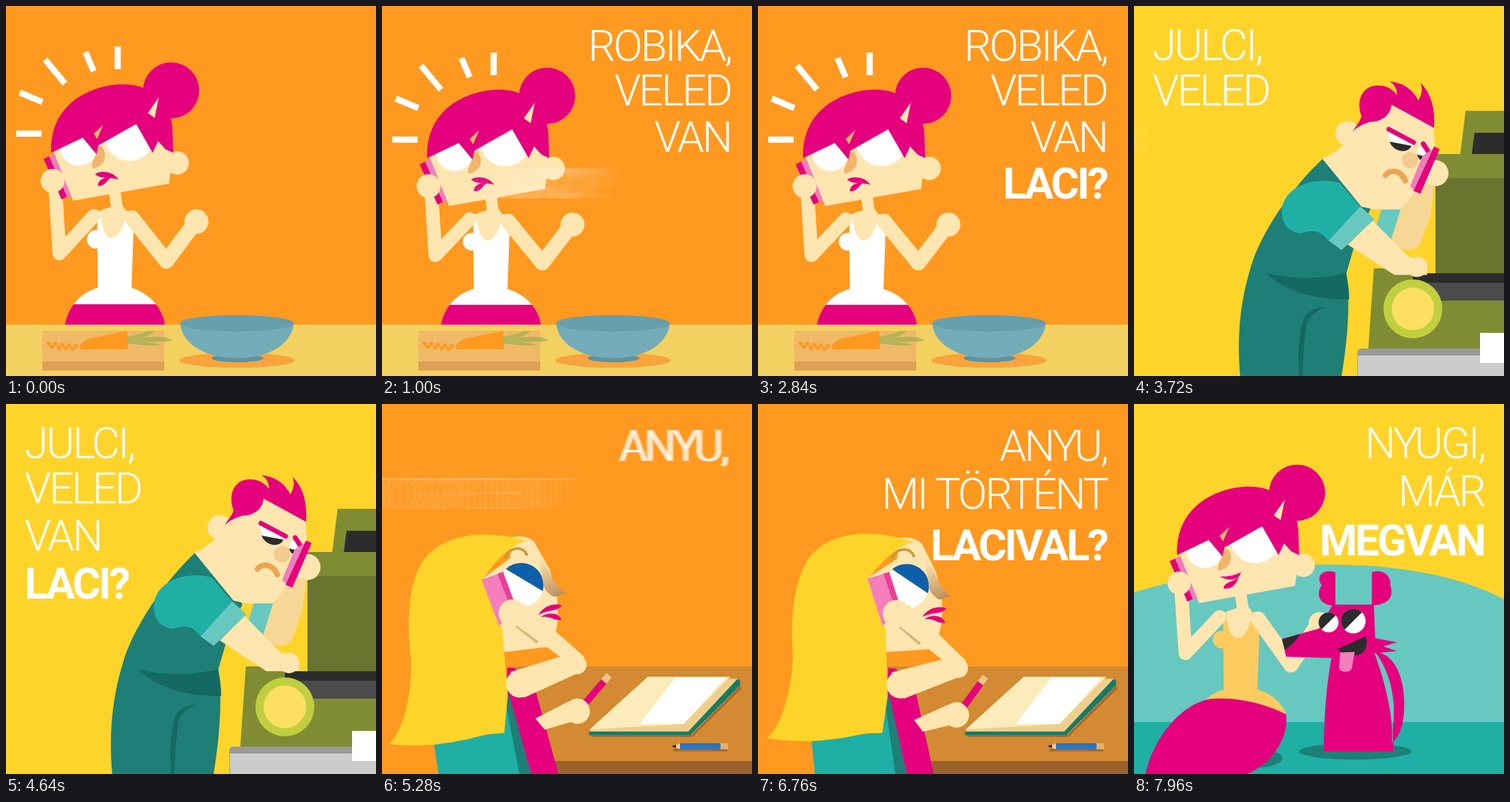
Write an HTML page with a canvas that moves like this. It is 540 px wide and 540 px high and loops after 8 s.

```html
<!DOCTYPE html>
<html lang="hu">
<head>
<meta charset="utf-8">
<title>Telefon</title>
<style>
html, body { margin: 0; width: 100%; height: 100%; overflow: hidden; background: #ff991f; }
canvas { display: block; width: 540px; height: 540px; }
</style>
</head>
<body>
<canvas id="stage" width="540" height="540"></canvas>
<script>
const ctx = document.getElementById('stage').getContext('2d');
const LOOP = 8000, BOB = 1840;
const C = {
  orange: '#ff991f', yellow: '#ffd42a', pink: '#e5007d', rose: '#f07fba', skin: '#ffe5b0',
  tan: '#f0b46c', teal: '#1fafa5', deep: '#1e7f76', mint: '#67c8c0', ink: '#2c2c2c',
  olive: '#7f8c33', moss: '#69742f', white: '#fff'
};

// Drawing helpers
function shape(color, d) {
  ctx.fillStyle = color;
  ctx.fill(new Path2D(d));
}
function line(color, width, d, cap = 'round') {
  ctx.strokeStyle = color;
  ctx.lineWidth = width;
  ctx.lineCap = cap;
  ctx.lineJoin = 'round';
  ctx.stroke(new Path2D(d));
}
function oval(color, x, y, rx, ry = rx) {
  ctx.fillStyle = color;
  ctx.beginPath();
  ctx.ellipse(x, y, rx, ry, 0, 0, 7);
  ctx.fill();
}
function box(color, x, y, w, h) {
  ctx.fillStyle = color;
  ctx.fillRect(x, y, w, h);
}
function group(draw) {
  ctx.save();
  draw();
  ctx.restore();
}
function shifted(x, y, draw) {
  group(() => { ctx.translate(x, y); draw(); });
}
function stretched(base, factor, draw) {
  group(() => {
    ctx.translate(0, base);
    ctx.scale(1, factor);
    ctx.translate(0, -base);
    draw();
  });
}
function turned(x, y, angle, draw) {
  group(() => {
    ctx.translate(x, y);
    ctx.rotate(angle);
    ctx.translate(-x, -y);
    draw();
  });
}
// White disc with a coloured segment between two angles
function splitEye(x, y, r, color, from, to = from + Math.PI) {
  oval(C.white, x, y, r);
  ctx.fillStyle = color;
  ctx.beginPath();
  ctx.arc(x, y, r, from, to);
  ctx.fill();
}

// Captions: each line rushes in from the left
function caption(t, align, x, rows) {
  ctx.textAlign = align;
  ctx.fillStyle = C.white;
  rows.forEach(([text, y], i) => {
    const bold = i === rows.length - 1;
    const p = Math.min(1, (t - 300 - 187 * i) / 320);
    if (p <= 0) return;
    ctx.font = `${bold ? 700 : 300} 63px Roboto, "Liberation Sans", sans-serif`;
    ctx.letterSpacing = bold ? '-3.2px' : '-3px';
    const dx = -520 * (1 - p) ** 2;
    const speed = 130 * (1 - p);
    if (speed < 3) {
      ctx.fillText(text, x + dx, y);
      return;
    }
    const n = 10;
    ctx.globalAlpha = 0.045 + 0.3 * p ** 6;
    for (let j = 0; j < n; j++) ctx.fillText(text, x + dx - speed * j / n, y);
    ctx.globalAlpha = 1;
  });
}

// Woman with the bun
function womanHead(happy) {
  oval(C.pink, 241, 131, 41);
  shape(C.pink, 'M55 231L63 227 89 286 81 290Z');
  shape(C.rose, 'M63 227L72 223 99 287 89 286Z');
  oval(C.skin, 250, 237, 17);
  shape(C.skin, 'M69 219L130 170 240 180 244 222 238 267 98 292Z');
  oval(C.white, 106, 214, 27);
  oval(C.white, 180, 197, 37);
  shape(C.tan, 'M139 212C148 222 147 241 127 245C122 237 132 230 134 214Z');
  shape(C.pink, 'M66 222C63 150 125 122 172 122C216 122 243 155 243 190L244 222 233 217 222 205 214 222 190 180 135 211 132 224 112 200Z');
  shape(C.tan, 'M142 181L128 194 133 202Z');
  shape(C.skin, 'M223 141L207 164 217 171Z');
  if (happy) {
    shape(C.pink, 'M128 253C138 254 150 252 159 247C158 256 145 263 128 253Z');
    shape(C.pink, 'M134 271C133 262 146 262 156 254C152 266 145 272 134 271Z');
  } else {
    shape(C.pink, 'M130 253C140 247 157 250 164 261C152 257 137 261 130 253Z');
    shape(C.pink, 'M134 270C134 262 144 257 153 258C147 263 143 272 134 270Z');
  }
}
function womanTop(color) {
  shape(color, 'M133 304H187L183 418H134Z');
  oval(color, 131, 344, 13);
  shape(C.skin, 'M138 303C138 325 145 342 154 342C165 342 174 323 175 303L170 296 166 268H149L153 298Z');
}
function womanArms(elbow, wrist) {
  line(C.skin, 20, 'M128 311L78 364 72 272');
  line(C.skin, 22, `M184 314L${elbow} ${wrist}`);
}

function kitchen(t, k) {
  box(C.orange, 0, 0, 540, 540);
  stretched(465, 1 + 0.03 * k, () => {
    const hips = 'M86 465C92 433 118 410 158 409C202 410 228 438 232 465Z';
    shape(C.white, hips);
    group(() => {
      ctx.beginPath();
      ctx.rect(0, 436, 540, 29);
      ctx.clip();
      shape(C.pink, hips);
    });
    womanTop(C.white);
    womanArms('234 375', '270 328');
    oval(C.skin, 278, 319, 17.5);
  });
  shifted(0, -8 * k, () => {
    womanHead(false);
    oval(C.skin, 68, 263, 17.5);
  });
  shifted(0, -9 * k, () => line(C.white, 9,
    'M15 195H52M20 135L53 149M57 87L86 122M116 76L128 104M163 68V101', 'butt'));

  box('#f3d160', 0, 465, 540, 75);
  box('#efb967', 53, 474, 178, 46);
  box('#dda056', 53, 519, 178, 13);
  shape('#b5b258', 'M176 482C192 482 201 474 217 474C208 483 197 486 179 488C202 484 224 478 244 488C222 492 198 489 178 489C199 489 218 492 226 495C205 497 187 493 176 492Z');
  shape(C.orange, 'M108 496C111 489 120 485 128 484L177 474 178 501H108Z');
  for (let i = 0; i < 9; i++) {
    const x = 58 + i * 5, y = 491 + (i * 5) % 9;
    shape(C.orange, `M${x} ${y}l5 -2 3 4 -5 3z`);
  }
  oval('#f8a43d', 337, 517, 84, 11);
  oval('#5e939f', 338, 514, 38, 6);
  shape('#73abb9', 'M254 463C258 499 300 514 337 514C375 514 416 499 420 463Z');
  oval('#689fac', 337, 463, 83, 12);
  caption(t, 'right', 509, [['ROBIKA,', 80], ['VELED', 145], ['VAN', 213], ['LACI?', 281]]);
}

// Worker at the machine
function machine() {
  shape(C.olive, 'M484 153H540V217H476Z');
  shape(C.ink, 'M497 185H540V216H493Z');
  box(C.moss, 440, 245, 100, 146);
  box(C.olive, 438, 216, 102, 35);
  shape(C.olive, 'M350 383H407V390H540V500H342Z');
  shape(C.ink, 'M407 390H540V404H407Z');
  box('#4b4b4b', 414, 404, 126, 26);
  oval('#c0cf3e', 407, 442, 43);
  oval('#ffdf60', 407, 442, 31);
  shape('#999', 'M332 500H540V540H326V506Q326 500 332 500Z');
  box('#cccccc', 327, 510, 213, 30);
  box(C.white, 505, 477, 35, 44);
}
function workerBody() {
  shape('#f6d795', 'M396 265L440 245 432 305 418 342C411 356 392 356 382 344L365 323Z');
  shape(C.mint, 'M362 290H390L375 338 352 322Z');
  shape(C.deep, 'M276 217L345 292 322 345 310 387C316 430 312 485 303 540H155C150 480 155 430 170 380C184 328 232 258 276 217Z');
  shape('#146a63', 'M193 387C230 397 275 396 309 387Q314 405 314 426C270 428 220 415 193 387Z');
  shape('#146a63', 'M279 437C258 441 248 448 246 460C238 490 240 520 241 540H246C246 510 250 480 252 462C258 448 270 442 279 437Z');
  shape(C.skin, 'M348 309L400 362 424 370 428 390H380L312 345Z');
  oval(C.skin, 413, 378, 15);
  shape(C.teal, 'M216 290C222 258 262 243 300 253L330 288 284 339C266 318 256 326 242 328C222 325 214 310 216 290Z');
  shape(C.mint, 'M330 288L351 307 303 353 284 339Z');
}
function workerHead() {
  oval(C.skin, 440, 238, 19);
  oval(C.skin, 312, 180, 18);
  shape(C.skin, 'M318 172L372 138 437 166 439 200 410 265 390 291H352L332 287 275 217Q300 205 312 190Z');
  shape(C.white, 'M371 177L407 195C403 210 374 212 371 177Z');
  shape(C.ink, 'M373 192L405 198C400 210 379 208 373 192Z');
  shape(C.white, 'M414 201Q413 220 428 214L423 199Z');
  shape(C.ink, 'M413 211Q417 224 428 214Z');
  oval('#f3cb8e', 403, 219, 12);
  line('#eca550', 8, 'M367 241C374 231 390 234 396 249');
  line(C.pink, 7, 'M372 174L408 193M422 195L433 212');
  shape(C.pink, 'M319 178C324 168 330 163 332 155C323 130 335 110 355 110C368 110 376 114 384 124C384 115 380 108 373 104C395 106 408 118 415 132C421 122 421 114 418 106C432 120 440 140 438 172L376 138C374 155 360 163 345 163C335 166 325 170 319 178Z');
  shape(C.rose, 'M421 213L438 201 410 264 403 257Z');
  shape(C.pink, 'M438 199L446 203 418 268 408 264Z');
}
function workshop(t, k) {
  box(C.yellow, 0, 0, 540, 540);
  const low = 0.93 - k;
  machine();
  stretched(540, 1 - 0.02 * low, workerBody);
  shifted(0, 7 * low, workerHead);
  caption(t, 'left', 27, [['JULCI,', 79], ['VELED', 145], ['VAN', 214], ['LACI?', 284]]);
}

// Girl at the desk
function desk() {
  box('#d38a32', 185, 383, 355, 157);
  box('#9b622e', 185, 521, 355, 19);
  shape('#a8692a', 'M304 483H452L523 411 525 415 453 486H306Z');
  shape('#147c67', 'M302 479L388 398 522 402 523 410 450 483H302Z');
  shape('#efcf8b', 'M304 475L388 398 519 401 447 478H303Z');
  shape('#fcebbb', 'M303 475L388 398H508L440 467Z');
  shape(C.white, 'M428 399H502L440 467H376Z');
  box('#a8692a', 426, 503, 78, 4);
  shape('#f3c385', 'M422 499.5L435 495V504Z');
  shape(C.ink, 'M422 499.5L429 497V502Z');
  box('#2d74ba', 435, 495, 59, 9);
  box('#e0b070', 494, 495, 11, 9);
}
function girl(tilt) {
  shape(C.pink, 'M179 385H190L222 419 258 540 262 555H222L180 425Z');
  shape(C.teal, 'M75 500L177 478 181 425 217 540 222 555H85Z');
  shape(C.deep, 'M180 422L184 428 218 540 222 555H204L180 445Z');
  // The hand tips the pencil against the sway
  turned(283, 446, -2.5 * tilt, () => {
    line(C.pink, 10, 'M292 438L324 403', 'butt');
    line('#f3c385', 10, 'M323 404L331 395', 'butt');
  });
  shape(C.skin, 'M222 458L270 432 290 457 236 474Z');
  oval(C.skin, 283, 446, 18.5);
  shape(C.skin, 'M182 194Q205 190 215 201L238 240 250 282 252 312 246 352 175 362 155 300 140 256 180 225Z');
  splitEye(197, 264, 32.5, '#0d5fa9', 3.93, 6.53);
  line('#c99b40', 4, 'M173 224C180 207 198 207 204 219');
  const g = ctx.createLinearGradient(222, 225, 258, 278);
  g.addColorStop(0, C.skin);
  g.addColorStop(1, '#b98b58');
  shape(g, 'M219 214L238 245Q246 264 262 274L246 280Q231 274 229 260Z');
  shape(C.pink, 'M223 307C231 292 247 289 257 292C251 302 238 298 223 307Z');
  shape(C.pink, 'M226 310C238 301 253 303 257 313C246 316 241 307 226 310Z');
  shape(C.yellow, 'M203 199C150 184 75 187 48 240C28 285 34 340 39 380C40 430 30 480 10 500C60 505 110 496 150 483L177 480 181 425 171 330 141 256C160 228 180 206 203 199Z');
  shape('#f57fbb', 'M139 257L163 248 186 302 166 324Z');
  shape('#ea3f9b', 'M162 248L170 245 186 285 180 292Z');
  line('#d8b67b', 9, 'M192 321L224 345', 'butt');
  shape(C.skin, 'M184 391L256 367 190 322 201 290 291 366 290 387 205 428Z');
  oval(C.skin, 198, 408, 20);
  oval(C.skin, 281, 378, 14);
  oval(C.skin, 185, 305, 20);
}
function study(t, k) {
  box(C.orange, 0, 0, 540, 540);
  desk();
  const tilt = (k - 0.16) * 0.095;
  turned(180, 540, tilt, () => girl(tilt));
  caption(t, 'right', 509, [['ANYU,', 83], ['MI TÖRTÉNT', 153], ['LACIVAL?', 228]]);
}

// Woman with the dog
function dogBody() {
  shape(C.pink, 'M352 362C385 365 397 410 394 450C392 475 385 490 374 495C385 450 380 400 352 362Z');
  shape(C.pink, 'M290 362L349 358C368 410 380 460 378 507H277C277 450 282 400 290 362Z');
  line(C.mint, 1, 'M352 364C368 408 379 455 377 493', 'butt');
}
function dogHead() {
  shape(C.pink, 'M216 343L270 328 290 293H350L352 342 384 348 364 354 384 361 350 364 290 371 222 369Z');
  shape(C.pink, 'M294 246V294C272 296 264 278 274 265C264 250 278 240 294 246Z');
  shape(C.pink, 'M347 246C364 240 376 252 374 265C380 280 372 294 347 294Z');
  shape(C.ink, 'M216 344L242 336Q236 349 220 359Z');
  splitEye(284, 319, 14.5, C.ink, Math.PI * 0.75);
  splitEye(320, 317, 18, C.ink, Math.PI * 0.75);
  shape(C.ink, 'M296 358C310 352 325 346 338 339C343 352 337 366 324 367C312 367 303 363 296 358Z');
  shape(C.rose, 'M301 363L322 362 318 386C316 393 300 393 299 385Z');
}
function park(t, k) {
  box(C.yellow, 0, 0, 540, 540);
  shape(C.mint, 'M0 275C150 228 400 210 540 285V465H0Z');
  box(C.teal, 0, 464, 540, 76);
  oval(C.deep, 175, 517, 42, 14);
  oval(C.deep, 323, 507, 82, 12);
  shifted(-3, 0, () => {
    stretched(465, 1 + 0.03 * k, () => {
      womanTop('#fccb5f');
      shape('#fccb5f', 'M106 434C130 404 208 403 226 455Z');
      womanArms('232 381', '267 328');
      oval(C.skin, 274, 320, 16);
    });
    shape(C.pink, 'M20 540C32 482 80 430 122 430C160 428 200 440 225 453C229 482 210 522 168 540Z');
    shifted(0, -1 - 8 * k, () => {
      womanHead(true);
      oval(C.skin, 69, 263, 17);
    });
  });
  stretched(507, 1 + 0.015 * k, () => {
    dogBody();
    dogHead();
  });
  caption(t, 'right', 511, [['NYUGI,', 79], ['MÁR', 149], ['MEGVAN', 221]]);
}

const SCENES = [[6800, park], [4680, study], [2880, workshop], [0, kitchen]];
const origin = performance.now();
function frame() {
  const now = (performance.now() - origin) % LOOP;
  const [start, draw] = SCENES.find(([s]) => now >= s);
  const t = now - start;
  const k = (1 + Math.cos((t - 80) / BOB * 2 * Math.PI)) / 2;
  draw(t, k);
  requestAnimationFrame(frame);
}
frame();
</script>
</body>
</html>
```
